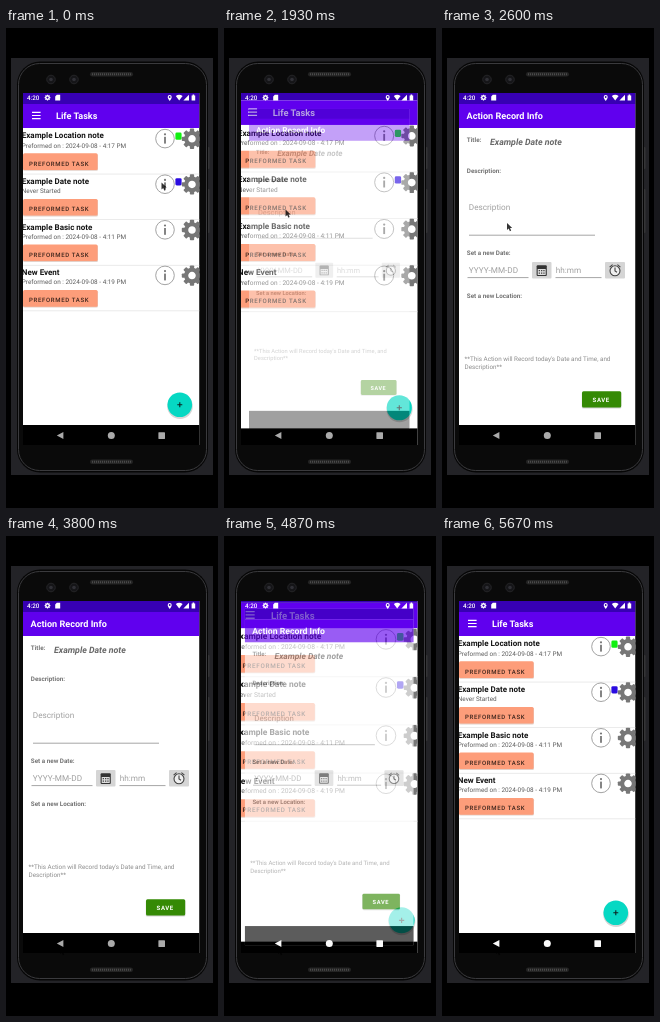
An HTML page for the animation above (5.87 s loop, 212 by 480 pixels).

```html
<!DOCTYPE html>
<html lang="en">
<head>
<meta charset="utf-8">
<title>Life Tasks</title>
<style>
  html, body { margin: 0; width: 100%; height: 100%; overflow: hidden; background: #000; }
  svg { display: block; width: 212px; height: 480px; }
  text { font-family: Roboto, "Open Sans", sans-serif; text-rendering: geometricPrecision; white-space: pre; }
</style>
</head>
<body>
<svg id="stage" viewBox="0 0 212 480" xmlns="http://www.w3.org/2000/svg"></svg>
<script>
const LOOP = 5870, FPS = 15, ROW = 45.6;
const LEFT = 17, WIDE = 176.5, TOP = 65, TALL = 352;
const CX = LEFT + WIDE / 2, CY = TOP + TALL / 2;

// Markup helpers
const rect = (x, y, w, h, fill, r = 0, more = '') =>
  `<rect x="${x}" y="${y}" width="${w}" height="${h}" rx="${r}" fill="${fill}" ${more}/>`;
const circle = (x, y, r, fill, more = '') =>
  `<circle cx="${x}" cy="${y}" r="${r}" fill="${fill}" ${more}/>`;
const path = (d, fill, more = '') => `<path d="${d}" fill="${fill}" ${more}/>`;
const line = (d, color, w) => path(d, 'none', `stroke="${color}" stroke-width="${w}"`);
const text = (x, y, size, str, fill, weight = 400, more = '') =>
  `<text x="${x}" y="${y}" font-size="${size}" font-weight="${weight}" fill="${fill}" ${more}>${str}</text>`;
const group = (id, body, more = '') => `<g id="${id}" ${more}>${body}</g>`;
const band = (y, h, fill) => rect(LEFT, y, WIDE, h, fill);

function gear(x, y, r, color) {
  let s = '';
  for (let a = 0; a < 360; a += 45)
    s += rect(-r * .21, -r, r * .42, r * .5, color, r * .08, `transform="rotate(${a})"`);
  return `<g transform="translate(${x} ${y})">${s}` +
    circle(0, 0, r * .57, 'none', `stroke="${color}" stroke-width="${r * .4}"`) + '</g>';
}

function phone() {
  let s = rect(5, 30, 202, 417, '#232327');
  s += rect(201, 119, 2.5, 22, '#343436', 1) + rect(201, 161, 2.5, 44, '#343436', 1);
  s += rect(11, 33.5, 191, 411, '#060606', 23);
  s += rect(12.5, 35.5, 188, 407, '#0a0a0a', 21, 'stroke="#3a3a3d" stroke-width="1"');
  for (const x of [45, 68])
    s += circle(x, 51.5, 4.3, '#151518', 'stroke="#2a2a2d" stroke-width=".8"') + circle(x, 51.5, 1.8, '#303036');
  for (const y of [44, 431.5]) {
    s += rect(84, y, 43, 4.6, '#242424', 2.3);
    s += path(`M86 ${y + 2.3}H125`, 'none', 'stroke="#4a4a4a" stroke-width="2" stroke-dasharray="1 1"');
  }
  return s + band(TOP, TALL, '#000');
}

const screenBase = (x, title) => band(TOP, TALL, '#fff') + band(TOP, 11, '#3700b3') +
  band(76, 24, '#6000ee') + band(397, 20, '#000') + text(x, 91.2, 9.1, title, '#fff', 700);

function row(i, title, note, tag) {
  let s = text(15.8, 110.4, 8, title, '#151515', 700) + text(15.8, 119.6, 6.4, note, '#5c5c5c');
  s += rect(17, 126, 75, 16.8, '#e3d0c8', 1.5) + rect(17, 125.3, 74.6, 16.6, '#fd9d7a', 1.5);
  if (i === 1) s += '<g clip-path="url(#btn)">' + circle(61.5, 135.5, 0, '#fff', 'id="ripple"') + '</g>';
  s += text(23, 137.6, 6, 'PREFORMED TASK', '#3a231b', 500, 'letter-spacing=".68"');
  s += circle(159, 110.6, 9.3, '#fff', 'stroke="#999" stroke-width=".9"') +
    circle(159, 106.3, 1.1, '#777') + rect(158.1, 108.8, 1.8, 6.8, '#777');
  if (tag) s += rect(169.4, 104.6, 6.2, 7.2, tag, 1.4);
  s += gear(186, 110.8, 10.2, '#777') + band(145.7, .7, '#e2e2e2');
  return `<g transform="translate(0 ${i * ROW})">${s}</g>`;
}

function listScreen() {
  const when = t => 'Preformed on : 2024-09-08 - ' + t + ' PM';
  const rows = [
    ['Example Location note', when('4:17'), '#10f010'],
    ['Example Date note', 'Never Started', '#2a0be0'],
    ['Example Basic note', when('4:11')],
    ['New Event', when('4:19')]
  ];
  return screenBase(50, 'Life Tasks') + line('M26 84.4h8.6M26 87.5h8.6M26 90.6h8.6', '#fff', 1.2) +
    rows.map((r, i) => row(i, ...r)).join('') +
    circle(174, 378.2, 12.8, '#000', 'opacity=".16"') +
    circle(173.8, 376.8, 12.3, '#06d8c3') + line('M171.3 376.8h5M173.8 374.3v5', '#0b2523', 1.1);
}

function formScreen() {
  const label = (y, s) => text(24.8, y, 6.3, s, '#747474', 700);
  const hint = (x, y, s) => text(x, y, 8.2, s, '#a0a0a0');
  const small = (y, s) => text(22.6, y, 6.3, s, '#8c8c8c');
  const calendar = rect(90, 234, 19.5, 16.5, '#d5d5d5', 1) +
    rect(94.6, 237.2, 10.2, 10.8, '#333', 1) + rect(95.7, 241, 8, 6, '#ddd') +
    path('M96.7 242.6h6.4M96.7 245.2h6.4', 'none', 'stroke="#444" stroke-width="1.3" stroke-dasharray="1.3 1"');
  const alarm = rect(163, 234, 20, 16.5, '#d5d5d5', 1) +
    circle(173, 242.8, 5, '#eee', 'stroke="#444" stroke-width="1.1"') +
    line('M173 239.6v3.4l2 1.2M167.6 239.2l3-2.6M178.4 239.2l-3-2.6', '#444', 1.1);
  return screenBase(24.6, 'Action Record Info') +
    label(114.4, 'Title:') + text(48, 117, 8.8, 'Example Date note', '#686868', 700, 'font-style="italic"') +
    label(145, 'Description:') + hint(26.8, 182, 'Description') +
    label(227, 'Set a new Date:') + hint(26.8, 245.2, 'YYYY-MM-DD') + hint(113.8, 245.2, 'hh:mm') +
    line('M27 207.2H153M25.5 249.6H86.5M113.5 249.6H159.5', '#8f8f8f', .8) + calendar + alarm +
    label(269.6, 'Set a new Location:') +
    small(333.4, "**This Action will Record today's Date and Time, and") + small(341.2, 'Description**') +
    rect(139.8, 364, 39.6, 16.4, '#d4d4d4', 1.5) + rect(140, 363.2, 39.2, 16.3, '#358a05', 1.5) +
    text(150.6, 373.6, 6, 'SAVE', '#fff', 700, 'letter-spacing=".6"');
}

const statusIcons = text(21, 71.8, 6.3, '4:20', '#fff', 500) + gear(41.5, 69.6, 2.9, '#fff') +
  path('M50.8 66.8h3.4v5.6h-5v-4z', '#fff') +
  path('M163.7 73c-1.4-1.9-2-2.9-2-4a2 2 0 0 1 4 0c0 1.1-.6 2.1-2 4z', '#fff') + circle(163.7, 69, .9, '#3700b3') +
  path('M169.8 68q3.4-2.6 6.8 0l-3.4 4.4z', '#fff') + path('M183 66.8v5.6h-5.6z', '#fff') +
  path('M185.6 67.4h1v-.8h1.6v.8h1v5h-3.6z', '#fff');

const navIcons = path('M50.8 407.5l6.6-3.6v7.2z', 'inherit') + circle(105.3, 407.5, 3.5, 'inherit') +
  rect(152.4, 404.3, 6.6, 6.6, 'inherit', .4);

document.getElementById('stage').innerHTML = `<defs>
    <clipPath id="screen">${band(TOP, TALL, '#fff')}</clipPath>
    <clipPath id="btn">${rect(17, 125.3, 74.6, 16.6, '#fff', 1.5)}</clipPath>
  </defs>` + phone() +
  '<g clip-path="url(#screen)">' + group('list', listScreen()) + group('form', formScreen()) +
  '<ellipse id="press" cx="54" cy="408" ry="10.5" fill="#fff"/></g>' +
  group('status', statusIcons) + group('nav', navIcons) +
  group('cursor', path('M0 0v7l1.7-1.5 1.2 2.7 1.3-.6-1.2-2.6h2.2z', '#000'), 'opacity=".8"');

const [list, form, press, nav, cursor, ripple] =
  ['list', 'form', 'press', 'nav', 'cursor', 'ripple'].map(id => document.getElementById(id));

// Pointer legs: start, end, x, y
const HOME = [155.5, 154.5];
const LEGS = [[0, 400, 61.5, 181.5], [2400, 2600, 65, 195], [2600, 2800, 30, 422], [3270, 3800, 54, 411]];

const ramp = (t, a, b) => Math.min(1, Math.max(0, (t - a) / (b - a)));
const smooth = p => p * p * (3 - 2 * p);
const easeOut = (p, n) => 1 - (1 - p) ** n;
const pulse = p => Math.sin(Math.PI * p);

function set(el, attrs) {
  for (const k in attrs) el.setAttribute(k, attrs[k]);
}

const zoom = s => `translate(${CX} ${CY}) scale(${s}) translate(${-CX} ${-CY})`;

function pointer(t) {
  return LEGS.reduce(([x, y], [a, b, tx, ty]) => {
    const p = smooth(ramp(t, a, b));
    return [x + (tx - x) * p, y + (ty - y) * p];
  }, HOME);
}

function draw(ms) {
  const t = Math.floor((ms % LOOP + 4) * FPS / 1000) * 1000 / FPS;

  const open = easeOut(ramp(t, 1870, 2330), 3.4), close = easeOut(ramp(t, 4800, 5400), 5);
  const alpha = ramp(t, 1900, 1990) * (1 - ramp(t, 4830, 4930));
  const covered = open === 1 && close === 0;
  set(list, {
    transform: zoom(close > 0 ? 1.1 - .1 * close : 1 + .055 * open),
    visibility: covered ? 'hidden' : 'visible'
  });
  set(form, { transform: zoom(.85 + .15 * open - .1 * close), opacity: alpha });

  const tap = ramp(t, 1000, 1600), back = ramp(t, 3930, 4530);
  set(ripple, { r: 4 + 62 * tap, opacity: .25 * pulse(tap) });
  set(press, { rx: 31 * easeOut(back, 3), opacity: .2 * pulse(back) });

  const g = Math.round(170 + 80 * ramp(t, 3930, 4130));
  set(nav, { fill: `rgb(${g},${g},${g})` });
  set(cursor, { transform: `translate(${pointer(t).join(' ')})` });
}

const start = performance.now();
function loop() {
  draw(performance.now() - start);
  requestAnimationFrame(loop);
}
loop();
</script>
</body>
</html>
```
